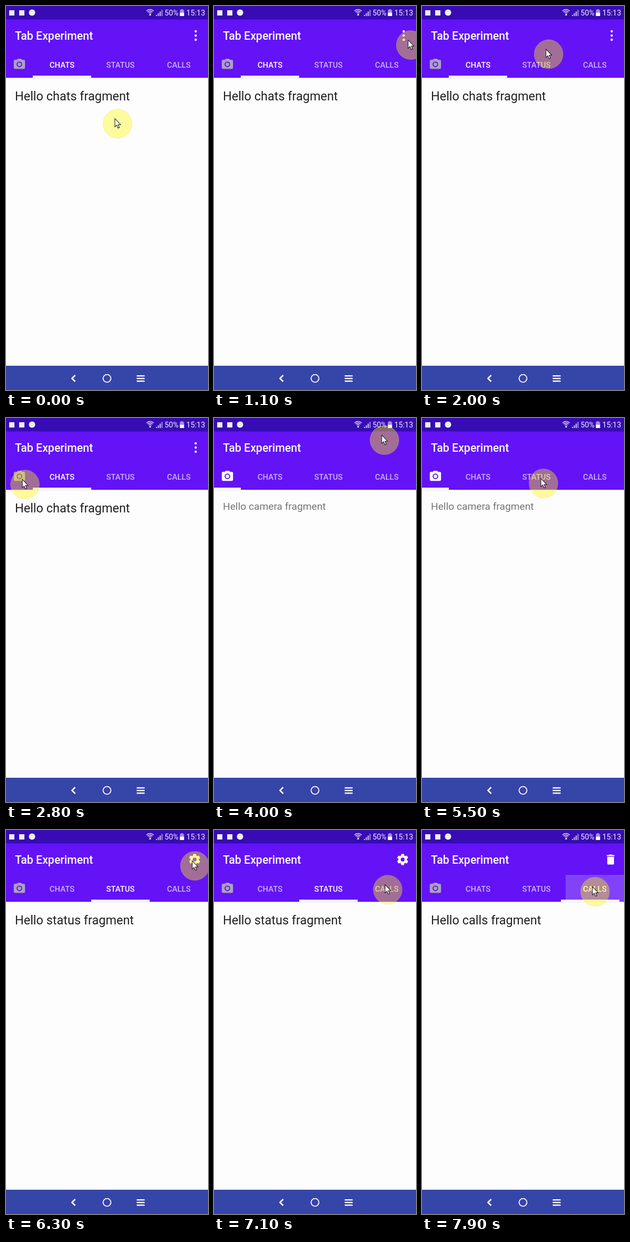
Write an HTML page with a canvas that moves like this. It is 384 px wide and 728 px high and loops after 8 s.

```html
<!DOCTYPE html>
<html lang="en">
<head>
<meta charset="utf-8">
<title>Tab Experiment</title>
<style>
  html, body { margin: 0; width: 100%; height: 100%; overflow: hidden; background: #fdfdfd; }
  canvas { display: block; width: 384px; height: 728px; }
</style>
</head>
<body>
<canvas id="stage" width="384" height="728"></canvas>
<script>
const ctx = document.getElementById('stage').getContext('2d');
const W = 384, H = 728, LOOP = 8000, STEP = 100, DP = 384 / 360;
const PURPLE = '#6313f6', FONT = 'Roboto, sans-serif';

const TABS = [
  { x: 0, w: 51, body: 'Hello camera fragment' },
  { x: 51, w: 111, label: 'CHATS', body: 'Hello chats fragment', icon: drawDots },
  { x: 162, w: 111, label: 'STATUS', body: 'Hello status fragment', icon: drawGear },
  { x: 273, w: 111, label: 'CALLS', body: 'Hello calls fragment', icon: drawTrash }
];
const TAPS = [
  { t: -1000, tab: 1 }, { t: 3400, tab: 0 }, { t: 5750, tab: 2 }, { t: 7700, tab: 3 }
];

// Pointer halo centre: time, x, y
const PATH = [
  [0, 212, 223], [100, 214, 220], [350, 290, 105], [600, 342, 44], [700, 342, 44],
  [1100, 374, 74], [1300, 366, 89], [1600, 350, 64], [1850, 300, 78], [2200, 150, 108],
  [2500, 58, 118], [2800, 36, 126], [2900, 36, 126], [3200, 39, 127], [3600, 38, 126],
  [4000, 324, 42], [4200, 354, 40], [4400, 362, 56], [4650, 345, 80], [5100, 224, 130],
  [5500, 231, 124], [6000, 232, 122], [6300, 359, 68], [6500, 356, 46], [6700, 345, 72],
  [6900, 328, 107], [7200, 331, 114], [7300, 331, 114], [7600, 329, 117], [8000, 329, 117]
];

const CAMERA = new Path2D('M9 2L7.17 4H4c-1.1 0-2 .9-2 2v12c0 1.1.9 2 2 2h16c1.1 0 2-.9 2-2V6c0-1.1-.9-2-2-2h-3.17L15 2H9z' +
  'M12 17a5 5 0 1 1 0-10 5 5 0 0 1 0 10zM12 8.8a3.2 3.2 0 1 0 0 6.4 3.2 3.2 0 0 0 0-6.4z');
const TRASH = new Path2D('M6 19c0 1.1.9 2 2 2h8c1.1 0 2-.9 2-2V7H6v12zM19 4h-3.5l-1-1h-5l-1 1H5v2h14V4z');
const ARROW = new Path2D('M0 0V16.5L3.8 13L6.6 19L9.3 17.8L6.6 12H11.8Z');

const clamp = v => Math.max(0, Math.min(1, v));

// Material standard curve, cubic-bezier(.4, 0, .2, 1)
function ease(x) {
  let lo = 0, hi = 1;
  for (let i = 0; i < 20; i++) {
    const s = (lo + hi) / 2, r = 1 - s;
    if (1.2 * s * r * r + 0.6 * s * s * r + s * s * s < x) lo = s; else hi = s;
  }
  return lo * lo * (3 - 2 * lo);
}

// Monotone cubic through the pointer path
function along(t, axis) {
  const i = Math.max(0, PATH.findIndex(p => p[0] > t) - 1);
  const slope = k => k < 0 || k >= PATH.length - 1 ? 0
    : (PATH[k + 1][axis] - PATH[k][axis]) / (PATH[k + 1][0] - PATH[k][0]);
  const tangent = k => {
    const a = slope(k - 1), b = slope(k);
    return a * b <= 0 ? 0 : 2 * a * b / (a + b);
  };
  const [a, b] = [PATH[i], PATH[i + 1]];
  const d = b[0] - a[0], u = (t - a[0]) / d, v = 1 - u;
  return a[axis] * (1 + 2 * u) * v * v + b[axis] * u * u * (3 - 2 * u) +
    d * u * v * (tangent(i) * v - tangent(i + 1) * u);
}

function rect(x, y, w, h, color) {
  ctx.fillStyle = color;
  ctx.fillRect(x, y, w, h);
}

function disc(x, y, r, color) {
  ctx.fillStyle = color;
  ctx.beginPath();
  ctx.arc(x, y, r, 0, 7);
  ctx.fill();
}

function text(str, x, y, size, color, weight = 400, align = 'left') {
  ctx.font = `${weight} ${size}px ${FONT}`;
  ctx.textAlign = align;
  ctx.fillStyle = color;
  ctx.fillText(str, x, y);
}

function glyph(path, x, y, scale, color, rule = 'nonzero') {
  ctx.save();
  ctx.translate(x, y);
  ctx.scale(scale, scale);
  ctx.fillStyle = color;
  ctx.fill(path, rule);
  ctx.restore();
}

function drawDots() {
  for (const y of [48, 56, 64]) disc(360.6, y, 2.2, '#fff');
}

function drawTrash() {
  glyph(TRASH, 345.8, 43.2, DP, '#fff');
}

function drawGear() {
  ctx.save();
  ctx.translate(358.6, 56);
  disc(0, 0, 7.9, '#fff');
  for (let i = 0; i < 6; i++) {
    ctx.beginPath();
    ctx.moveTo(-3.6, -6.5);
    ctx.lineTo(-2.4, -10.6);
    ctx.lineTo(2.4, -10.6);
    ctx.lineTo(3.6, -6.5);
    ctx.fill();
    ctx.rotate(Math.PI / 3);
  }
  disc(0, 0, 3.7, PURPLE);
  ctx.restore();
}

function drawStatusBar() {
  rect(0, 0, W, 25.5, '#370cb4');
  rect(6, 8, 10, 10, '#eee');
  rect(25, 8, 10, 10, '#eee');
  disc(49.5, 12.5, 6, '#eee');

  ctx.strokeStyle = '#e4def5';
  ctx.lineWidth = 1.4;
  for (const r of [3.5, 6.5, 9.5]) {
    ctx.beginPath();
    ctx.arc(274, 16, r, -Math.PI * 0.76, -Math.PI * 0.24);
    ctx.stroke();
  }
  disc(274, 16.5, 1.8, '#e4def5');
  for (let i = 0; i < 4; i++) {
    const h = 2 + i * 3.2;
    rect(285 + i * 3.5, 19 - h, 2, h, i < 3 ? '#d4cbef' : '#a894de');
  }
  text('50%', 301.5, 18, 14.2, '#f2effb');
  rect(332.5, 6, 4, 2, '#a18edb');
  rect(330.5, 7.5, 8, 5, '#a18edb');
  rect(330.5, 12.5, 8, 6.5, '#fff');
  text('15:13', 378.5, 18, 14.4, '#f2effb', 400, 'right');
}

function drawRipple(tab, age) {
  if (age < 0 || age > 500) return;
  const alpha = 0.2 * (1 - clamp((age - 250) / 250));
  ctx.save();
  ctx.beginPath();
  ctx.rect(tab.x, 85, tab.w, 51);
  ctx.clip();
  disc(tab.x + tab.w / 2, 112, 20 + 50 * clamp(age / 180), `rgba(255,255,255,${alpha})`);
  ctx.restore();
}

function drawTabs(current, from, age) {
  drawRipple(current, age);
  glyph(CAMERA, 12.7, 97.8, DP, current === TABS[0] ? '#fff' : '#aaa3b8', 'evenodd');
  for (const tab of TABS) {
    if (!tab.label) continue;
    const color = tab === current ? '#fff' : 'rgba(255,255,255,.68)';
    text(tab.label, tab.x + tab.w / 2, 117, 14 * DP, color, 500, 'center');
  }
  const k = ease(clamp(age / 300));
  rect(from.x + (current.x - from.x) * k, 132, from.w + (current.w - from.w) * k, 4.3, '#fff');
}

function drawNav() {
  rect(0, 682, W, 46, '#3645a8');
  ctx.strokeStyle = '#fff';
  ctx.lineWidth = 2.6;
  ctx.beginPath();
  ctx.moveTo(131.5, 700);
  ctx.lineTo(125.5, 706);
  ctx.lineTo(131.5, 712);
  ctx.stroke();
  ctx.lineWidth = 1.8;
  ctx.beginPath();
  ctx.arc(192, 706, 7.4, 0, 7);
  ctx.stroke();
  for (const y of [700, 705, 710]) rect(248.5, y, 15, 2.4, '#fff');
}

function drawPointer(t) {
  const x = along(t, 1), y = along(t, 2);
  disc(x, y, 27.5, 'rgba(255,248,12,.4)');
  ctx.strokeStyle = 'rgba(225,205,60,.25)';
  ctx.lineWidth = 1;
  ctx.stroke();
  ctx.save();
  ctx.translate(x - 5, y - 9.5);
  ctx.scale(0.92, 0.95);
  ctx.fillStyle = '#fff';
  ctx.strokeStyle = '#111';
  ctx.lineWidth = 1.1;
  ctx.fill(ARROW);
  ctx.stroke(ARROW);
  ctx.restore();
}

function draw(t) {
  const n = TAPS.filter(tap => tap.t <= t).length - 1;
  const current = TABS[TAPS[n].tab], from = TABS[TAPS[Math.max(0, n - 1)].tab];

  rect(0, 0, W, H, '#fdfdfd');
  rect(0, 25, W, 111.3, PURPLE);
  rect(0, 136.3, W, 1, '#efedf3');
  drawStatusBar();
  text('Tab Experiment', 17, 64, 20 * DP, '#fff', 500);
  if (current.icon) current.icon();
  drawTabs(current, from, t - TAPS[n].t);
  if (current.label) text(current.body, 17, 178.5, 22 * DP, '#212121');
  else text(current.body, 17, 174, 18 * DP, '#757575');
  drawNav();
  drawPointer(t);
}

const start = performance.now();
function tick() {
  const t = (performance.now() - start) % LOOP;
  draw(Math.floor(t / STEP) * STEP);
  requestAnimationFrame(tick);
}
tick();
</script>
</body>
</html>
```
